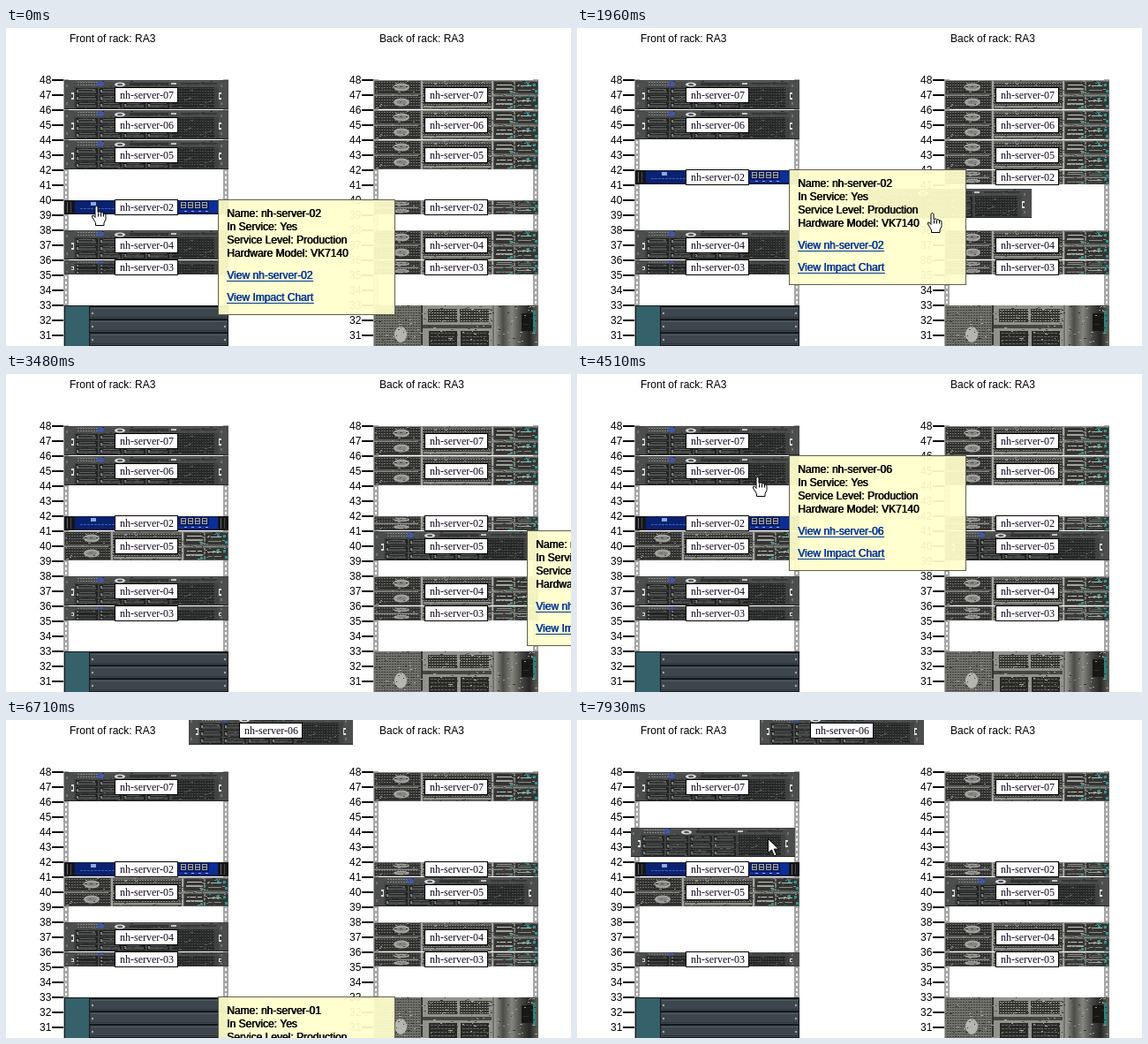
Recreate the animation shown at these times as an HTML page with a canvas. Size 640 by 360 pixels, loop 7990 ms.

```html
<!DOCTYPE html>
<html lang="en">
<head>
<meta charset="utf-8">
<title>Rack view</title>
<style>
html, body { margin: 0; height: 100%; overflow: hidden; background: #fff; }
canvas { display: block; }
</style>
</head>
<body>
<canvas id="stage" width="640" height="360"></canvas>
<script>
const ctx = document.getElementById('stage').getContext('2d');
const LOOP = 7990, FRONT = 66, BACK = 417;
const SANS = '12px "Liberation Sans", Arial, sans-serif';
const SERIF = '12px "Liberation Serif", Times, serif';
const unitTop = unit => 58 + (48 - unit) * 17;

let seed = 7;
const random = () => (seed = seed * 16807 % 2147483647) / 2147483647;

function box(g, color, x, y, w, h) {
  g.fillStyle = color;
  g.fillRect(x, y, w, h);
}

function oval(g, color, x, y, rx, ry) {
  g.fillStyle = color;
  g.beginPath();
  g.ellipse(x, y, rx, ry, 0, 0, 7);
  g.fill();
}

function mesh(g, color, x, y, w, h, pitch = 3) {
  for (let j = 0; j < h; j += pitch)
    for (let i = 0; i < w; i += pitch) box(g, color, x + i, y + j, pitch - 1, 1);
}

function speckle(g, count, colors, x, y, w, h) {
  for (let i = 0; i < count; i++)
    box(g, colors[i % colors.length], x + Math.floor(random() * w), y + Math.floor(random() * h), 1 + Math.floor(random() * 3), 1);
}

function picture(w, h, draw) {
  const canvas = document.createElement('canvas');
  canvas.width = w;
  canvas.height = h;
  draw(canvas.getContext('2d'));
  return canvas;
}

const squeeze = source => picture(186, 16, g => g.drawImage(source, 0, 0, 186, 16));

const front = picture(186, 33, g => {
  box(g, '#414242', 0, 0, 186, 33);
  box(g, '#5c5d5d', 0, 1, 186, 1);
  box(g, '#4a4b4b', 0, 2, 186, 6);
  box(g, '#262626', 0, 32, 186, 1);
  mesh(g, '#858686', 15, 2, 22, 5);
  oval(g, '#4259a8', 41, 4, 4, 3);
  oval(g, '#ddd', 63, 5, 6, 2.5);
  oval(g, '#556', 63, 5, 3, 1.2);
  box(g, '#303131', 74, 3, 44, 3);
  box(g, '#c4c4c4', 121, 3, 6, 2);
  box(g, '#363737', 132, 3, 40, 2);
  for (let row = 0; row < 3; row++)
    for (let col = 0; col < 4; col++) {
      const x = 13 + col * 27, y = 9 + row * 8;
      box(g, '#222323', x, y, 25, 7);
      box(g, '#616262', x + 4, y + 1, 18, 1);
      box(g, '#484949', x + 2, y + 3, 21, 3);
      box(g, '#7d7e7e', x + 1, y + 2, 2, 3);
    }
  box(g, '#262727', 122, 8, 48, 23);
  mesh(g, '#484949', 123, 9, 46, 21);
  for (const x of [0, 175]) {
    box(g, '#4c4d4d', x, 1, 11, 31);
    box(g, '#707171', x + 2, 5, 2, 3);
    box(g, '#707171', x + 2, 25, 2, 3);
  }
  for (const [x, gap] of [[8, 8], [175, 176]]) {
    box(g, '#e2e2e2', x, 14, 3, 8);
    box(g, '#444', gap, 16, 2, 4);
  }
  speckle(g, 160, ['#333', '#565757'], 12, 1, 160, 31);
});

const back = picture(186, 33, g => {
  box(g, '#5e5f5b', 0, 0, 186, 33);
  box(g, '#3b3c39', 54, 3, 79, 26);
  mesh(g, '#80817b', 55, 3, 77, 26);
  box(g, '#a5a69f', 53, 0, 2, 33);
  box(g, '#a5a69f', 133, 0, 2, 33);
  box(g, '#90918a', 56, 29, 76, 2);
  for (const y of [0, 17]) {
    box(g, '#2f302e', 1, y + 1, 51, 14);
    mesh(g, '#6c6d69', 2, y + 2, 49, 12);
    oval(g, '#a4a5a1', 31, y + 8, 9, 4.5);
    oval(g, '#858682', 31, y + 8, 6, 2.5);
    box(g, '#8b8c86', 0, y, 186, 1);
    box(g, '#343532', 136, y + 2, 49, 13);
    box(g, '#c9cac5', 139, y + 5, 17, 1);
    box(g, '#a3a49e', 138, y + 9, 19, 2);
    box(g, '#7a7b76', 158, y + 2, 2, 13);
    box(g, '#b5b6b0', 162, y + 6, 16, 1);
    box(g, '#8b8c86', 163, y + 11, 15, 1);
    for (const [dx, dy] of [[180, 4], [154, 12], [173, 3], [182, 11]]) box(g, '#2d9494', dx, y + dy, 3, 3);
  }
  speckle(g, 220, ['#2c2d2b', '#8f908a', '#474845'], 0, 0, 184, 33);
  speckle(g, 12, ['#2b9797', '#1c6d6d'], 158, 2, 26, 30);
});

const appliance = picture(186, 16, g => {
  box(g, '#0b2f98', 0, 0, 186, 16);
  box(g, '#14204c', 12, 0, 162, 1);
  box(g, '#08164a', 12, 14, 162, 2);
  box(g, '#0a2270', 12, 1, 46, 13);
  for (const x of [0, 174]) {
    box(g, '#15161b', x, 0, 12, 16);
    box(g, '#666', x + 3, 2, 1, 12);
    box(g, '#484848', x + 7, 2, 1, 12);
  }
  box(g, '#8ea6e0', 30, 2, 6, 4);
  mesh(g, '#3f5db4', 18, 9, 38, 4, 4);
  box(g, '#081c60', 130, 1, 34, 10);
  g.strokeStyle = '#a9ab9c';
  for (let i = 0; i < 4; i++) {
    g.strokeRect(132.5 + i * 8, 2.5, 5, 6);
    box(g, '#a9ab9c', 132 + i * 8, 5, 6, 1);
    box(g, '#9dade0', 136 + i * 8, 12, 3, 1);
  }
});

const chassisFront = picture(186, 47, g => {
  box(g, '#15191c', 0, 0, 186, 47);
  box(g, '#35616a', 1, 1, 27, 46);
  for (let y = 2; y < 47; y += 15) {
    box(g, '#3c464c', 29, y, 156, 13);
    box(g, '#515c63', 30, y + 1, 154, 1);
    box(g, '#2d353a', 30, y + 11, 154, 1);
    for (const x of [32, 182]) oval(g, '#a2a8ac', x, y + 7, 1.2, 1.2);
  }
});

const chassisBack = picture(186, 47, g => {
  box(g, '#70716b', 0, 0, 186, 47);
  mesh(g, '#40413d', 2, 2, 50, 44, 3);
  oval(g, '#b5b6b1', 30, 33, 7, 9);
  box(g, '#92938c', 54, 0, 80, 47);
  box(g, '#33342f', 53, 0, 2, 47);
  for (const x of [61, 97]) {
    box(g, '#33342f', x, 4, 33, 15);
    mesh(g, '#90918a', x + 1, 5, 31, 13);
    box(g, '#292a26', x + 1, 29, 32, 18);
    mesh(g, '#65665f', x + 3, 31, 28, 15, 4);
  }
  box(g, '#454640', 55, 22, 78, 4);
  const blur = g.createLinearGradient(136, 0, 186, 0);
  ['#9d9e97', '#4b4c47', '#85867f', '#4a4b46', '#262724', '#66675f'].forEach((c, i) => blur.addColorStop(i / 5, c));
  box(g, blur, 136, 0, 50, 47);
  box(g, '#171816', 167, 9, 13, 20);
  box(g, '#2d8580', 180, 6, 3, 26);
  speckle(g, 160, ['#333', '#a5a69f', '#55564f'], 0, 0, 135, 47);
  speckle(g, 50, ['#30312d', '#9a9b94'], 136, 0, 48, 47);
});

const front1 = squeeze(front), back1 = squeeze(back);

// from, to, x, y, picture, name
const END = LOOP + 1;
const mounted = (from, to, x, unit, img, id) => ({ from, to, x, y: unitTop(unit) + 1, img, id });
const servers = [
  mounted(0, END, FRONT, 48, front, '07'),
  mounted(0, 4600, FRONT, 46, front, '06'),
  mounted(0, 1780, FRONT, 44, front, '05'),
  mounted(0, 260, FRONT, 40, appliance, '02'),
  mounted(1110, END, FRONT, 42, appliance, '02'),
  mounted(3480, END, FRONT, 41, back, '05'),
  mounted(0, 7200, FRONT, 38, front, '04'),
  mounted(0, END, FRONT, 36, front1, '03'),
  mounted(0, END, FRONT, 33, chassisFront),
  mounted(0, END, BACK, 48, back, '07'),
  mounted(0, 6350, BACK, 46, back, '06'),
  mounted(0, 3480, BACK, 44, back, '05'),
  mounted(0, 1110, BACK, 40, back1, '02'),
  mounted(1110, END, BACK, 42, back1, '02'),
  mounted(3480, END, BACK, 41, front, '05'),
  mounted(0, END, BACK, 38, back, '04'),
  mounted(0, END, BACK, 36, back1, '03'),
  mounted(0, END, BACK, 33, chassisBack),
  { from: 6350, to: END, x: 207, y: -5, img: front, id: '06' }
];

const drags = [
  { from: 260, to: 1110, img: appliance, path: [[260, 66, 195], [980, 67, 167]] },
  { from: 1780, to: 3480, img: front, path: [[1780, 66, 127], [1900, 93, 138], [1960, 329, 182], [2040, 418, 180], [2380, 423, 177]] },
  { from: 4600, to: 6350, img: front, path: [[4600, 66, 93], [5110, 207, -5]] },
  { from: 7200, to: END, img: front, path: [[7200, 66, 229], [7930, 61, 122]] }
];

// from, to, x, unit, server
const tips = [
  [0, 370, 240, 40, '02'], [1110, 1170, 240, 42, '02'], [1170, 1580, 240, 38, '04'],
  [1580, 2020, 240, 42, '02'], [2700, 3480, 240, 33, '01'], [3480, 3610, 590, 41, '05'],
  [4010, 4070, 240, 33, '01'], [4380, 4640, 240, 46, '06'], [6400, 6540, 240, 38, '04'],
  [6540, 6940, 240, 33, '01'], [6940, 7260, 240, 38, '04']
];

const pointer = [
  [0, 102, 201], [260, 102, 201], [980, 103, 173], [1110, 84, 237], [1400, 87, 236],
  [1580, 95, 176], [1700, 99, 150], [1780, 99, 150], [1900, 126, 161], [1960, 402, 209],
  [2040, 450, 204], [2380, 456, 201], [2580, 400, 235], [2760, 182, 342], [2820, 167, 390],
  [3610, 167, 390], [4010, 186, 335], [4070, 183, 138], [4330, 187, 132], [4500, 204, 116],
  [4600, 204, 116], [5110, 345, 16], [5510, 345, 16], [6290, 225, 219], [6350, 222, 240],
  [6600, 181, 350], [6660, 178, 390], [6780, 178, 390], [6860, 183, 345], [7060, 221, 242],
  [7200, 221, 242], [7930, 216, 134]
];
const arrowTimes = [[2580, 2700], [4070, 4450], [4700, 6350], [7260, END]];

const bursts = [
  [0, 0, 1], [260, 980, 13], [1110, 1900, 13], [1960, 2380, 8], [2580, 2820, 5], [3480, 3610, 2],
  [4010, 4070, 2], [4330, 5110, 14], [5510, 6290, 14], [6350, 7140, 13], [7200, 7930, 12]
];

function recordedTime(t) {
  const [start, end, steps] = bursts.findLast(b => b[0] <= t);
  if (steps === 1 || t >= end) return end;
  const step = (end - start) / (steps - 1);
  return start + Math.floor((t - start) / step + 1e-6) * step;
}

function along(path, t) {
  const i = path.findIndex(p => p[0] > t);
  if (i < 0) return path[path.length - 1].slice(1);
  if (i === 0) return path[0].slice(1);
  const a = path[i - 1], b = path[i];
  const u = (t - a[0]) / (b[0] - a[0]), k = u * u * (3 - 2 * u);
  return [1, 2].map(n => a[n] + (b[n] - a[n]) * k);
}

function text(str, x, y, font = SANS, color = '#000') {
  ctx.font = font;
  ctx.fillStyle = color;
  ctx.fillText(str, x, y);
}

function drawRack(x, title) {
  text(title, x + 6, 16);
  for (let unit = 48; unit > 30; unit--) {
    const y = unitTop(unit);
    text(unit, x - 28, y + 5);
    box(ctx, '#000', x - 14, y, 13, 2);
  }
  for (const rail of [x - 1, x + 180]) {
    box(ctx, '#a6a6a6', rail, 58, 6, 302);
    for (let y = 60; y < 360; y += 17 / 3) box(ctx, '#f4f4f4', rail + 2, Math.round(y), 2, 3);
  }
}

function drawServer({ x, y, img, id }) {
  ctx.drawImage(img, x, y);
  if (!id) return;
  const top = y + Math.ceil(img.height / 2) - 9;
  box(ctx, '#000', x + 57, top, 72, 18);
  box(ctx, '#fff', x + 58, top + 1, 70, 16);
  text('nh-server-' + id, x + 63, top + 13, SERIF, '#140822');
}

function drawTip([, , x, unit, id]) {
  const y = unitTop(unit), name = 'nh-server-' + id;
  box(ctx, 'rgba(255,255,204,.93)', x, y, 201, 131);
  ctx.strokeStyle = '#5f5f4c';
  ctx.strokeRect(x + .5, y + .5, 200, 130);
  const bold = (str, dy, color) => [10, 10.7].forEach(dx => text(str, x + dx, y + dy, SANS, color));
  ['Name: ' + name, 'In Service: Yes', 'Service Level: Production', 'Hardware Model: VK7140']
    .forEach((line, i) => bold(line, 20 + i * 15));
  ['View ' + name, 'View Impact Chart'].forEach((line, i) => {
    bold(line, 90 + i * 25, '#003399');
    box(ctx, '#003399', x + 10, y + 92 + i * 25, ctx.measureText(line).width + 1, 1);
  });
}

const arrow = new Path2D('M0 0V16L4 12.5L7 19.5L9.6 18.3L6.7 11.6H12Z');
const hand = new Path2D('M-1.5 1Q0 -1 1.5 1V7Q4 5.5 5 7.5Q7.5 6.5 8 8.5Q10.5 8 10.5 10.5V15L8.5 19V22H-1V19L-5 12.5Q-5.5 10 -3.5 10.5L-1.5 13Z');

function drawPointer(t) {
  const [x, y] = along(pointer, t);
  const shape = arrowTimes.some(([from, to]) => t >= from && t < to) ? arrow : hand;
  ctx.save();
  ctx.translate(Math.round(x) + .5, Math.round(y) + .5);
  ctx.fillStyle = '#fff';
  ctx.strokeStyle = '#000';
  ctx.fill(shape);
  ctx.stroke(shape);
  if (shape === hand) for (const dx of [1.5, 4.5, 7.5]) box(ctx, '#000', dx, 8, 1, 4);
  ctx.restore();
}

function render(now) {
  const t = recordedTime(now % LOOP);
  const active = s => t >= s.from && t < s.to;
  box(ctx, '#fff', 0, 0, 640, 360);
  drawRack(FRONT, 'Front of rack: RA3');
  drawRack(BACK, 'Back of rack: RA3');
  servers.filter(active).forEach(drawServer);
  for (const d of drags.filter(active)) {
    const [x, y] = along(d.path, t).map(Math.round);
    ctx.drawImage(d.img, x, y);
  }
  tips.filter(([from, to]) => t >= from && t < to).forEach(drawTip);
  drawPointer(t);
}

const began = performance.now();
(function tick() {
  render(performance.now() - began);
  requestAnimationFrame(tick);
})();
</script>
</body>
</html>
```
